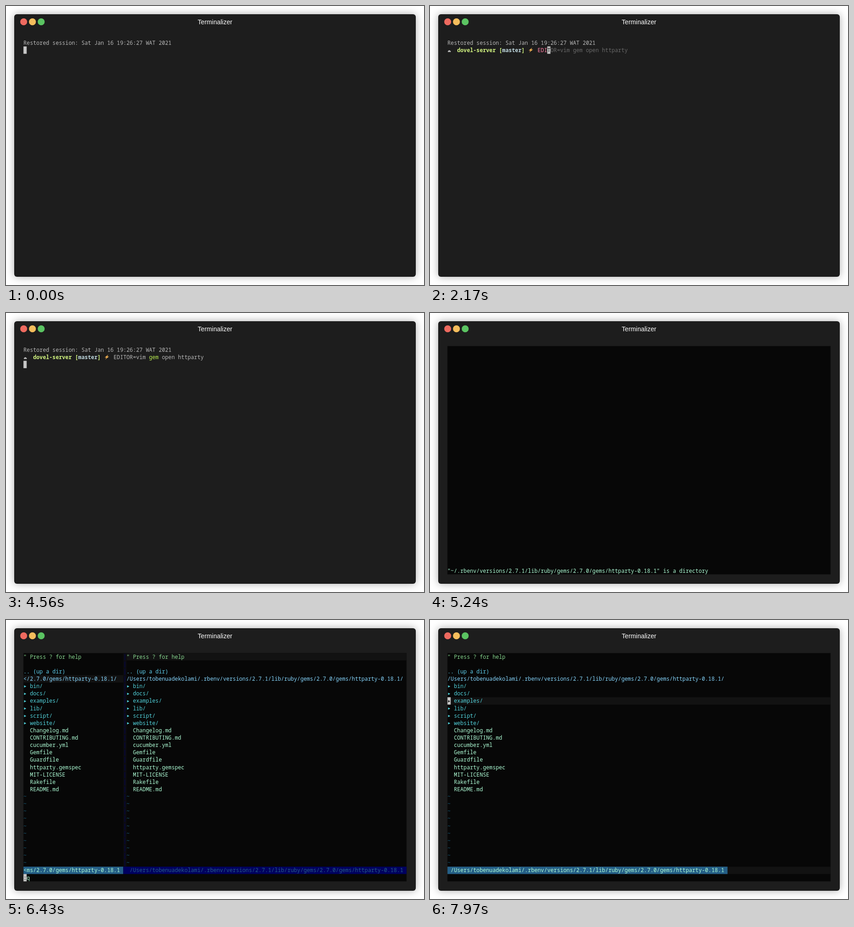
Recreate the animation shown at these times as an HTML page with a canvas. Size 917 px wide and 611 px high, loop 8 s.

```html
<!DOCTYPE html>
<html lang="en">
<head>
<meta charset="utf-8">
<title>Terminal session</title>
<style>
  html, body { margin: 0; width: 100%; height: 100%; overflow: hidden; background: #fff; }
  canvas { display: block; }
</style>
</head>
<body>
<canvas id="stage" width="917" height="611"></canvas>
<script>
const ctx = document.getElementById('stage').getContext('2d');
const LOOP = 8000;
const LEFT = 38.3, TOP = 72.4, CELL = 7.062, LINE = 16.13, COLS = 119, ROWS = 31;
const SPLIT = 31, STATUS = 29;
const C = {
  window: '#1d1d1d', text: '#b8b8b8', cursor: '#c6c6c6', hint: '#696969',
  lime: '#d3f681', branch: '#bfd8de', pink: '#ff80a4', gem: '#bdf153',
  vim: '#070707', line: '#121212', mint: '#afffd7', help: '#87d78f', up: '#5fd0ee',
  path: '#87d7ff', dir: '#52d3dc', tilde: '#1b617f', active: '#255f87', idle: '#00005f'
};

const COMMAND = 'EDITOR=vim gem open httparty';
const GEM_PATH = '/.rbenv/versions/2.7.1/lib/ruby/gems/2.7.0/gems/httparty-0.18.1';
const FULL_PATH = '/Users/tobenuadekolami' + GEM_PATH;
const DIRS = ['bin', 'docs', 'examples', 'lib', 'script', 'website'];
const FILES = ['Changelog.md', 'CONTRIBUTING.md', 'cucumber.yml', 'Gemfile', 'Guardfile',
  'httparty.gemspec', 'MIT-LICENSE', 'Rakefile', 'README.md'];

// [start time, characters typed]
const TYPING = [[750, 0], [970, 1], [1110, 2], [2170, 3], [2360, 4], [2490, 5], [2650, 6], [3300, 28]];
const MOVES = [7270, 7410, 7540, 7710, 7850, 7970];

const cellX = col => LEFT + col * CELL;
const cellY = row => TOP + row * LINE;

function shape(color, points) {
  ctx.fillStyle = color;
  ctx.beginPath();
  for (const [x, y] of points) ctx.lineTo(x, y);
  ctx.fill();
}

function circle(x, y, r, color) {
  ctx.fillStyle = color;
  ctx.beginPath();
  ctx.arc(x, y, r, 0, 7);
  ctx.fill();
}

function fill(row, col, width, color, height = 1) {
  ctx.fillStyle = color;
  ctx.fillRect(cellX(col), cellY(row), width * CELL, height * LINE);
}

function put(row, col, text, color, weight = 400) {
  ctx.font = `${weight} 11.77px "Noto Sans Mono", "DejaVu Sans Mono", monospace`;
  ctx.textAlign = 'left';
  [...text].forEach((ch, i) => {
    const x = cellX(col + i), y = cellY(row);
    if (ch === '▸') {
      shape(color, [[x + 1.4, y + 6.2], [x + 6.2, y + 8.7], [x + 1.4, y + 11.2]]);
    } else if (ch !== ' ') {
      ctx.fillStyle = color;
      ctx.fillText(ch, x, y + 12.2);
    }
  });
}

function cursor(row, col, under = ' ') {
  fill(row, col, 1, C.cursor);
  put(row, col, under, C.window);
}

function drawWindow() {
  ctx.fillStyle = '#fff';
  ctx.fillRect(0, 0, 917, 611);
  ctx.save();
  ctx.shadowColor = 'rgba(0,0,0,.32)';
  ctx.shadowBlur = 18;
  ctx.fillStyle = C.window;
  ctx.beginPath();
  ctx.roundRect(18, 18, 881, 575, 6);
  ctx.fill();
  ctx.restore();
  ['#ee6a5f', '#f5bd5c', '#5bc462'].forEach((color, i) => circle(38.8 + i * 19.2, 34.7, 7.6, color));
  ctx.font = '14.1px "Liberation Sans", Arial, sans-serif';
  ctx.textAlign = 'center';
  ctx.fillStyle = '#fff';
  ctx.fillText('Terminalizer', 458.5, 40.2);
}

function drawPrompt() {
  circle(40.6, 99.6, 1.5, C.text);
  circle(42.3, 98.6, 1.9, C.text);
  circle(44.2, 99.6, 1.5, C.text);
  put(1, 3, 'dovel-server', C.lime, 600);
  put(1, 16, '[', C.lime, 600);
  put(1, 17, 'master', C.branch, 600);
  put(1, 23, ']', C.lime, 600);
  shape('#f6b352', [[224.5, 91], [216.5, 97.5], [220.5, 97.5], [217.5, 102], [226, 95.3], [222, 95.3]]);
}

function drawShell(t) {
  put(0, 0, 'Restored session: Sat Jan 16 19:26:27 WAT 2021', C.text);
  if (t < 750) return cursor(1, 0);
  drawPrompt();
  const typed = TYPING.filter(([start]) => t >= start).pop()[1];
  const complete = typed === COMMAND.length;
  if (complete) {
    put(1, 28, COMMAND, C.text);
    fill(1, 39, 3, C.window);
    put(1, 39, 'gem', C.gem);
  } else if (typed) {
    put(1, 28, COMMAND.slice(0, typed), C.pink);
    put(1, 28 + typed, COMMAND.slice(typed), C.hint);
  }
  if (t >= 4560) cursor(2, 0);
  else cursor(1, 28 + typed, typed && !complete ? COMMAND[typed] : ' ');
}

function drawTildes(col, from) {
  for (let row = from; row < STATUS; row++) put(row, col, '~', C.tilde);
}

function drawTree(col, path, fileCount = FILES.length) {
  put(0, col, '" Press ? for help', C.help);
  put(2, col, '.. (up a dir)', C.up);
  put(3, col, path, C.path);
  DIRS.forEach((name, i) => put(4 + i, col, `▸ ${name}/`, C.dir));
  FILES.slice(0, fileCount).forEach((name, i) => put(10 + i, col + 2, name, C.mint));
}

function drawSplit(t) {
  const right = SPLIT + 1;
  const rightReady = t >= 5530, leftReady = t >= 5550;
  fill(0, right, COLS - right, C.line);
  fill(leftReady ? 3 : 0, 0, SPLIT, C.line);
  fill(0, SPLIT, 1, '#0c0c12', STATUS);
  for (let row = 0; row < STATUS; row++) put(row, SPLIT, '|', C.idle);

  if (leftReady) drawTree(0, '</2.7.0/gems/httparty-0.18.1/');
  drawTildes(0, leftReady ? 19 : 1);
  drawTree(right, FULL_PATH + '/', rightReady ? 9 : 8);
  if (rightReady) drawTildes(right, 19);

  fill(STATUS, 0, SPLIT, C.active);
  fill(STATUS, SPLIT, COLS - SPLIT, C.idle);
  put(STATUS, 0, '<ms/2.7.0/gems/httparty-0.18.1', C.mint);
  if (rightReady) put(STATUS, right + 1, FULL_PATH, C.active);

  if (t >= 6120) {
    put(30, 0, t < 6280 ? ':' : ':q', C.mint);
    if (t >= 6430) cursor(30, 0, ':');
    else cursor(30, t < 6280 ? 1 : 2);
  } else if (leftReady) {
    cursor(3, 0, '<');
  }
}

function drawSingle(t) {
  const row = MOVES.filter(start => t >= start).length;
  fill(row, 0, COLS, C.line);
  drawTree(0, FULL_PATH + '/');
  drawTildes(0, 19);
  fill(STATUS, 0, COLS, C.line);
  fill(STATUS, 0, FULL_PATH.length + 2, C.active);
  put(STATUS, 1, FULL_PATH, C.mint);
  cursor(row, 0, ['"', ' ', '.', '/', '▸', '▸', '▸'][row]);
}

function drawVim(t) {
  fill(0, 0, COLS, C.vim, ROWS);
  if (t < 5430) {
    put(30, 0, `"~${GEM_PATH}" is a directory`, C.mint);
    if (t >= 5270) cursor(0, 0);
  } else if (t < 6450) {
    drawSplit(t);
  } else {
    drawSingle(t);
  }
}

function frame() {
  const t = performance.now() % LOOP;
  drawWindow();
  if (t < 5240) drawShell(t);
  else drawVim(t);
  requestAnimationFrame(frame);
}
frame();
</script>
</body>
</html>
```
